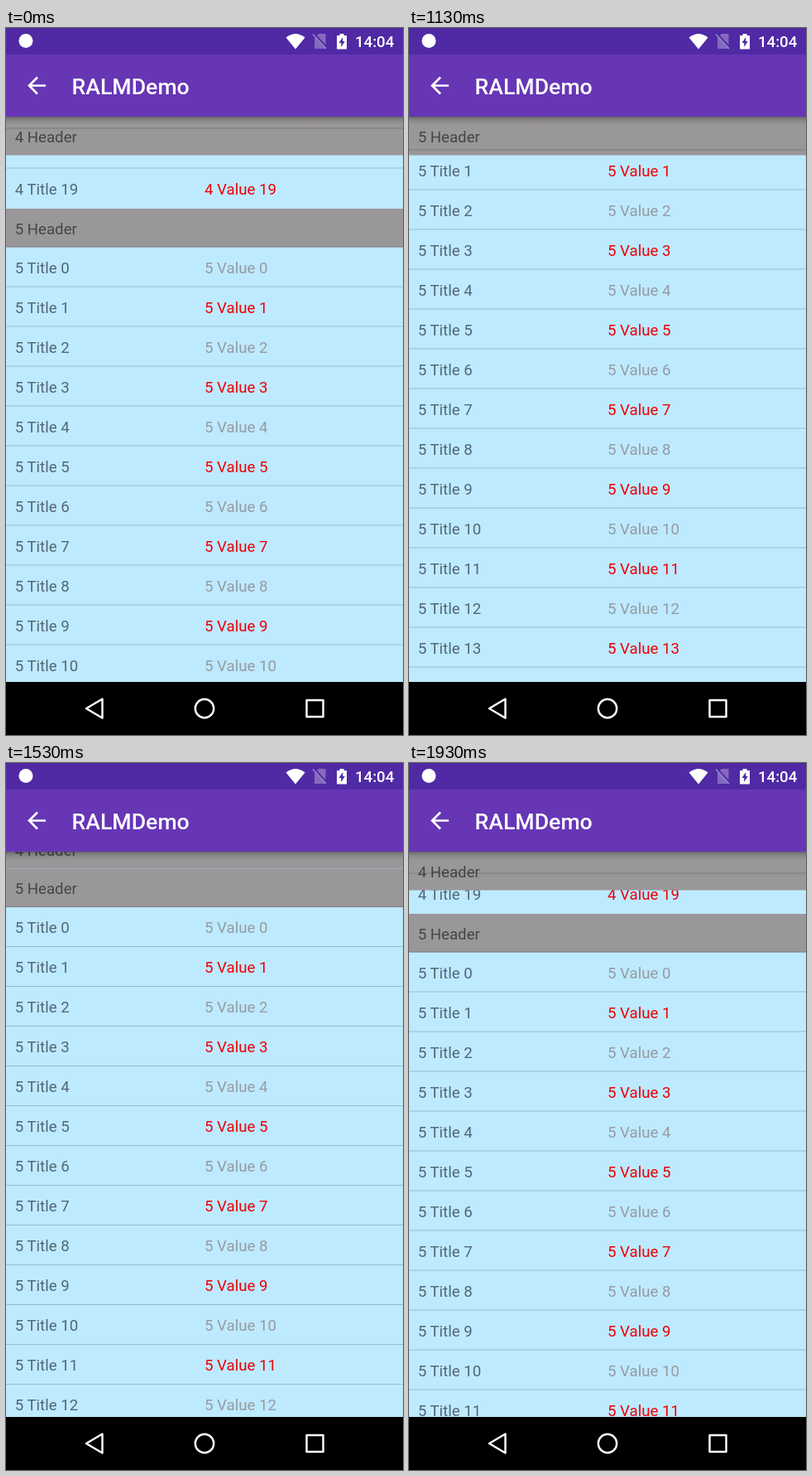
These frames come from a looping animation (480 px wide and 853 px high, 1.99 s). An HTML page:

```html
<!DOCTYPE html>
<html lang="en">
<head>
<meta charset="utf-8">
<title>Sticky header list</title>
<style>
  @property --scroll { syntax: "<length>"; inherits: true; initial-value: 0px; }

  html, body { margin: 0; width: 100%; height: 100%; overflow: hidden; background: #000; }
  svg { display: block; width: 100%; height: 100%; animation: drag 1990ms step-end infinite; }
  text { font: 18.67px Roboto, sans-serif; }

  .scroll { transform: translateY(calc(-1 * var(--scroll))); }
  .current { transform: translateY(max(107px, 218px - var(--scroll))); }
  .previous { transform: translateY(min(107px, 171.5px - var(--scroll))); }

  .header rect { fill: #9a979a; }
  .header text { fill: #464547; }
  .title { fill: #526775; }
  .even { fill: #969ba1; }
  .odd { fill: #ee0006; }
  .appbar { font-weight: 500; font-size: 26.67px; fill: #fff; }
  .clock { font-weight: 500; fill: #fff; text-anchor: end; }
  .outline { fill: none; stroke: #fff; stroke-width: 2.4; stroke-linejoin: round; }

  /* Drag up, pause, fling back down */
  @keyframes drag {
    0% { --scroll: 0px; }
    40.2% { --scroll: 6px; }
    43.718% { --scroll: 46px; }
    46.733% { --scroll: 89.5px; }
    50.251% { --scroll: 123px; }
    53.768% { --scroll: 148px; }
    56.784% { --scroll: 165px; }
    60.301% { --scroll: 175.5px; }
    63.819% { --scroll: 180.5px; }
    70.351% { --scroll: 174.5px; }
    73.869% { --scroll: 134px; }
    76.884% { --scroll: 90.5px; }
    80.402% { --scroll: 62px; }
    83.919% { --scroll: 45px; }
    86.934% { --scroll: 39px; }
    90.452% { --scroll: 37px; }
    93.969%, 100% { --scroll: 36px; }
  }
</style>
</head>
<body>
<svg viewBox="0 0 480 853">
  <defs>
    <linearGradient id="shade" x2="0" y2="1">
      <stop stop-opacity=".32"/>
      <stop offset=".4" stop-opacity=".12"/>
      <stop offset="1" stop-opacity="0"/>
    </linearGradient>
  </defs>

  <rect width="480" height="853" fill="#beeaff"/>
  <g id="rows" class="scroll"></g>
  <g class="header previous">
    <rect width="480" height="46.5"/>
    <text x="10.67" y="30.7">4 Header</text>
  </g>
  <g class="header current">
    <rect width="480" height="46.5"/>
    <text x="10.67" y="30.7">5 Header</text>
  </g>
  <g id="dividers" class="scroll" fill-opacity=".2"></g>

  <rect y="107" width="480" height="10" fill="url(#shade)"/>
  <rect y="32" width="480" height="75" fill="#6636b5"/>
  <rect width="480" height="32" fill="#4f2aa4"/>

  <!-- Status bar -->
  <circle cx="24" cy="15.5" r="8.5" fill="#fff"/>
  <path d="M338.5 11.5Q350 2.5 361.500 11.500L350 25.500Z" fill="#fff"/>
  <path d="M378 7H386.500V25H373V12Z" fill="#fff" fill-opacity=".3"/>
  <path d="M372.500 7L388.500 24" stroke="#4f2aa4" stroke-width="2"/>
  <path d="M371 7.500L387 25" stroke="#9583c8" stroke-width="1.6"/>
  <path d="M403.500 7H408.500V9H412V25.500H400V9H403.500Z" fill="#fff"/>
  <path d="M407.200 11L402.500 18H405.200V23L409.700 16H407.200Z" fill="#4f2aa4"/>
  <text class="clock" x="469.3" y="23">14:04</text>

  <!-- App bar -->
  <path d="M48 69.500H28.500M38 59.500L28 69.500L38 79.500" fill="none" stroke="#fff" stroke-width="2.6"/>
  <text class="appbar" x="79.5" y="79.5">RALMDemo</text>

  <!-- Navigation bar -->
  <rect y="789" width="480" height="64"/>
  <path class="outline" d="M97 821L116.500 809.500V832.500Z"/>
  <circle class="outline" cx="240" cy="821" r="11.2"/>
  <rect class="outline" x="363.5" y="811" width="20" height="20"/>
</svg>
<script>
  const PITCH = 48;
  const rows = document.getElementById("rows");
  const dividers = document.getElementById("dividers");

  function add(parent, tag, attributes, content = "") {
    const node = document.createElementNS("http://www.w3.org/2000/svg", tag);
    for (const name in attributes) node.setAttribute(name, attributes[name]);
    node.textContent = content;
    parent.append(node);
  }

  function addRow(section, index, baseline) {
    add(rows, "text", { class: "title", x: 10.67, y: baseline }, `${section} Title ${index}`);
    add(rows, "text", { class: index % 2 ? "odd" : "even", x: 240, y: baseline }, `${section} Value ${index}`);
  }

  function addDivider(center) {
    add(dividers, "rect", { y: center - 0.5, width: 480, height: 1 });
  }

  addRow(4, 19, 200.7);
  addDivider(121);
  addDivider(169);
  addDivider(264);
  for (let i = 0; i < 16; i++) {
    addRow(5, i, 295.7 + i * PITCH);
    addDivider(312 + i * PITCH);
  }
</script>
</body>
</html>
```
